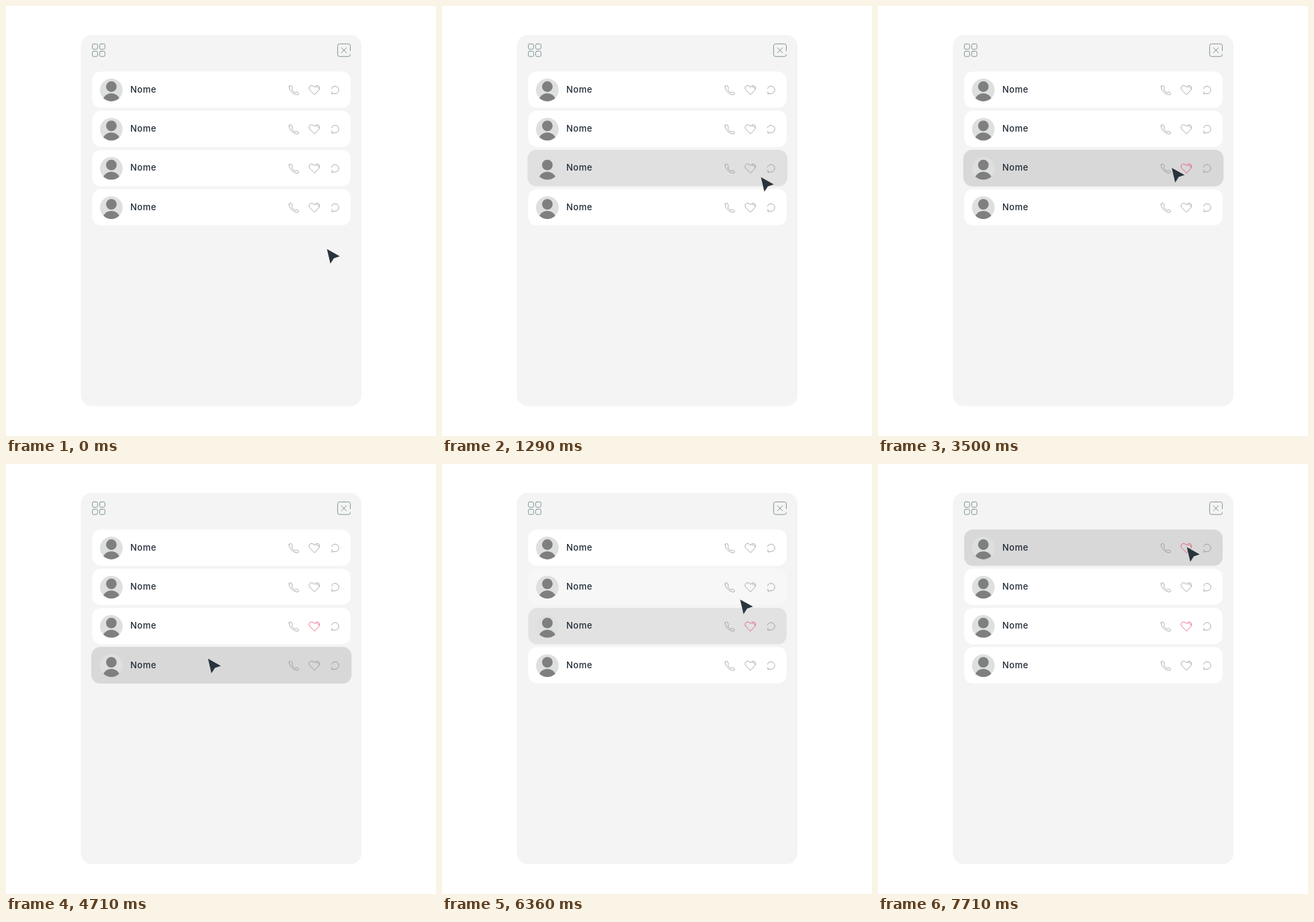
These frames come from a looping animation (640x640 px, 8140 ms). An HTML page:

```html
<!DOCTYPE html>
<html lang="pt">
<head>
<meta charset="utf-8">
<title>Contact list</title>
<style>
  html, body { margin: 0; width: 100%; height: 100%; overflow: hidden; background: #fff; }
  svg { display: block; width: 100%; height: 100%; }
  text { font: 500 13px Inter, "Open Sans", sans-serif; letter-spacing: .5px; fill: #202a35; }
  .icon { fill: none; stroke: #77807f; stroke-width: .65; stroke-linejoin: round; stroke-linecap: round; }
  .head { stroke: #75898a; stroke-width: .9; }
</style>
</head>
<body>
<svg viewBox="0 0 640 640">
  <defs>
    <clipPath id="disc"><circle cx="156.8" cy="125" r="16.9"/></clipPath>
    <g id="person">
      <circle cx="156.8" cy="125" r="16.9" fill="#dee0e0"/>
      <g fill="#7f7f7f" clip-path="url(#disc)">
        <circle cx="156.8" cy="120" r="7.9"/>
        <circle cx="156.8" cy="143.6" r="13.6"/>
      </g>
    </g>
    <path id="phone" d="M421.4 119.6c1-1.8 3.2-1.7 4 .1l.8 2c.4 1-.7 1.7-.6 2.6.4 2 2.3 4 4.3 4.5.9.1 1.5-1 2.5-.8l2.3 1c1.6.9 1 2.5-.3 3C428.8 132.6 420.6 126 421.4 119.6z"/>
    <path id="heart" d="M459 131.8L452.3 125.2C450 122.8 451 118.6 454.6 118.4C456.8 118.3 458 119.6 459 121C460 119.4 461.6 118.3 463.4 118.4C466.9 118.7 467.8 122.8 465.6 125.2ZM461.5 120.6C463.6 119.6 465.4 121 465.2 123"/>
    <path id="chat" d="M484.4 123A5.6 5.6 0 1 1 488 130.2L485.2 131.2L485 127.5"/>
    <rect id="tile" x="128.5" y="56.4" width="7.9" height="7.9" rx="2"/>
  </defs>
  <rect x="111.5" y="43" width="417.5" height="552.5" rx="16" fill="#f4f4f4"/>
  <g class="icon head">
    <use href="#tile"/>
    <use href="#tile" x="10.9"/>
    <use href="#tile" y="10.9"/>
    <use href="#tile" x="10.9" y="10.9"/>
    <path d="M512.5 72v.2a3 3 0 0 1-3 3h-12.9a3 3 0 0 1-3-3v-12.8a3 3 0 0 1 3-3h12.9a3 3 0 0 1 3 3v7.2"/>
    <path d="M499.2 62.1l7.6 7.6m0-7.6l-7.6 7.6"/>
  </g>
  <g id="list"></g>
  <path id="cursor" d="M-.3-.2L18.8 10.4L10 13.4L4.8 21.6Z" fill="#2a343e"/>
</svg>
<script>
const LOOP = 8140, FPS = 14, END = 7714;
const TOP = 97.5, HEIGHT = 54, PITCH = 58.35;
const FADE = 180, SAMPLES = 30;
const RETURN = 6000; // cards swell only before the pointer comes back

// Key points of the pointer tip: time, x, y
const path = [
  [0, 478, 362], [860, 478, 303], [1286, 475, 255], [1710, 468, 242],
  [3430, 440, 241], [4290, 364, 259], [4714, 301, 290], [5430, 251, 360],
  [5570, 246, 362], [6000, 327, 314], [6357, 444, 202], [6860, 476, 129],
  [END, 460, 124]
];
const likedAt = { 2: 2400, 0: 7250 };
const LIKE = 300;

const clamp = v => Math.min(1, Math.max(0, v));
const mix = (a, b, p) => Math.round(a + (b - a) * p);

const list = document.getElementById('list');
const cursor = document.getElementById('cursor');
list.innerHTML = [0, 1, 2, 3].map(i => `
  <g transform="translate(0 ${i * PITCH})">
    <rect class="card" x="128.3" y="${TOP}" width="384.7" height="${HEIGHT}" rx="13"/>
    <use href="#person"/>
    <text x="185" y="128.6">Nome</text>
    <g class="icon"><use href="#phone"/><use class="heart" href="#heart"/><use href="#chat"/></g>
  </g>`).join('');
const cards = list.querySelectorAll('.card');
const hearts = list.querySelectorAll('.heart');

const slope = (i, c) => (path[i + 1][c] - path[i][c]) / (path[i + 1][0] - path[i][0]);

// Monotone tangent: flat at turning points and at both ends
function tangent(i, c) {
  if (i === 0 || i === path.length - 1) return 0;
  const a = slope(i - 1, c), b = slope(i, c);
  return a * b > 0 ? 2 * a * b / (a + b) : 0;
}

function along(t, c) {
  let i = 0;
  while (i < path.length - 2 && t > path[i + 1][0]) i++;
  const p = path[i], q = path[i + 1], d = q[0] - p[0];
  const u = clamp((t - p[0]) / d), v = 1 - u;
  return v * v * (1 + 2 * u) * p[c] + u * u * (3 - 2 * u) * q[c]
    + d * u * v * (v * tangent(i, c) - u * tangent(i + 1, c));
}

// Share of the last FADE ms that the pointer spent on each card
function hoverLevels(t) {
  const levels = [0, 0, 0, 0];
  for (let k = 0; k < SAMPLES; k++) {
    const y = along(t - (k + .5) / SAMPLES * FADE, 2) - TOP;
    const row = Math.floor(y / PITCH);
    if (row in levels && y - row * PITCH < HEIGHT) levels[row] += 1 / SAMPLES;
  }
  return levels;
}

function draw(t) {
  cursor.setAttribute('transform', `translate(${along(t, 1)} ${along(t, 2)})`);

  hoverLevels(t).forEach((level, i) => {
    const g = mix(255, 216, level);
    const scale = t < RETURN ? 1 + .007 * level : 1;
    cards[i].setAttribute('fill', `rgb(${g},${g},${g})`);
    cards[i].setAttribute('transform',
      `translate(320.65 124.5) scale(${scale}) translate(-320.65 -124.5)`);

    const p = clamp((t - likedAt[i]) / LIKE) || 0;
    hearts[i].style.stroke = `rgb(${mix(119, 230, p)},${mix(128, 36, p)},${mix(127, 82, p)})`;
  });
}

const origin = performance.now();
function tick() {
  const t = (performance.now() - origin) % LOOP;
  // Poses advance at FPS; the small lead covers rounded delays
  draw(Math.min(END, Math.floor((t + 4.5) * FPS / 1000) * 1000 / FPS));
  requestAnimationFrame(tick);
}
tick();
</script>
</body>
</html>
```
